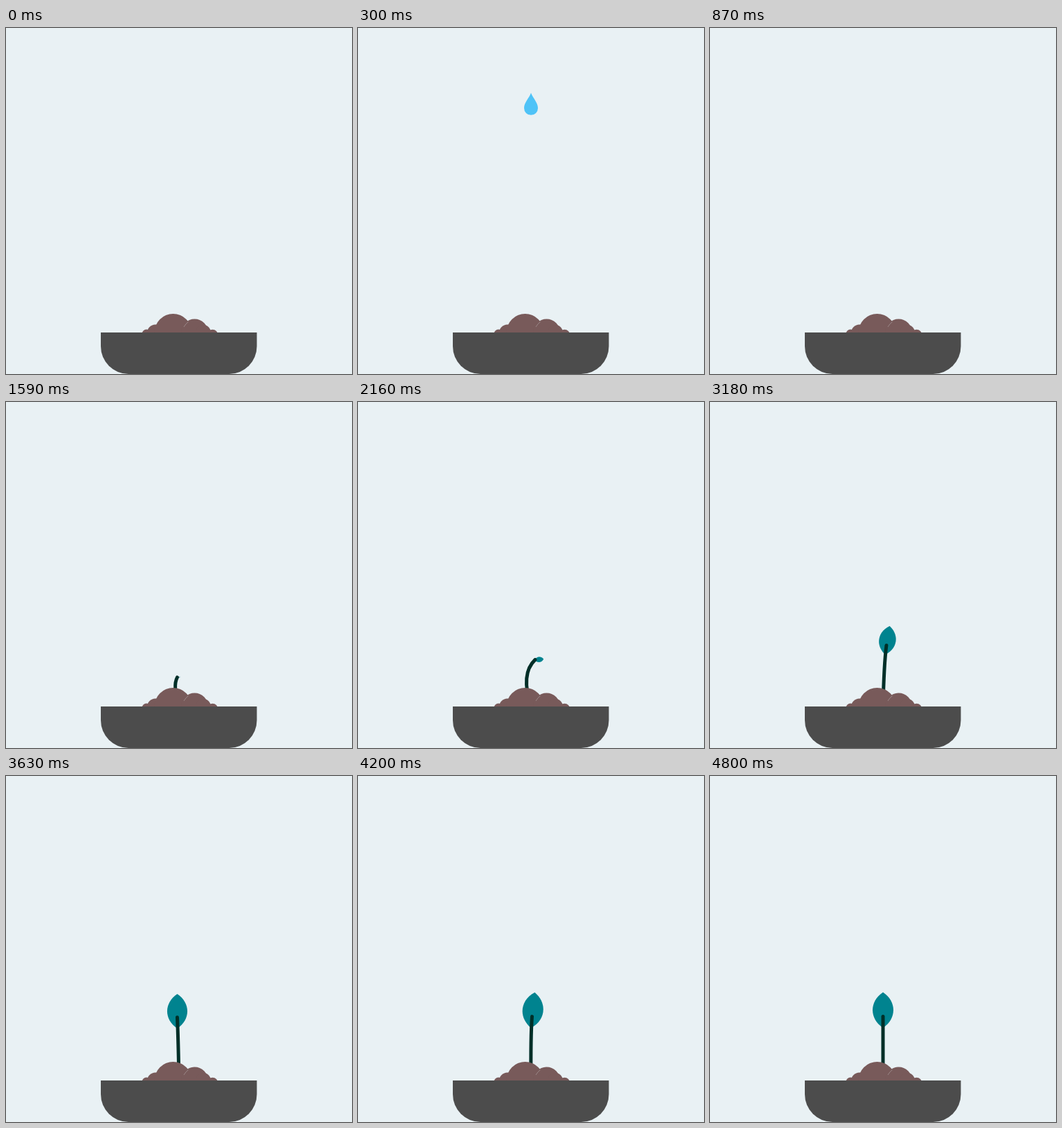
Animation, 500 px wide and 500 px high, one loop 5430 ms. Source, as an HTML page:

```html
<!DOCTYPE html>
<html lang="en">
<head>
<meta charset="utf-8">
<title>Sprout</title>
<style>
  html, body { margin: 0; width: 100%; height: 100%; overflow: hidden; background: #e9f1f4; }
  svg { display: block; width: 100%; height: 100%; }
</style>
</head>
<body>
<svg viewBox="0 0 500 500">
  <path id="drop" fill="#4fc3f7" d="M0 0C3 8 10 14 10 22A10 10 0 0 1 -10 22C-10 14 -3 8 0 0Z"/>
  <g id="plant">
    <path id="leaf" fill="#00838f" d="M0 -35C20 -21.5 20 3 0 16.5C-20 3 -20 -21.5 0 -35Z"/>
    <path id="stem" fill="none" stroke="#002f28" stroke-width="5" stroke-linecap="round"/>
  </g>
  <g fill="#785a5a">
    <circle cx="203" cy="442" r="6.5"/>
    <circle cx="216" cy="440.5" r="12"/>
    <circle cx="241.500" cy="440" r="27"/>
    <circle cx="272.5" cy="440" r="19.5"/>
    <circle cx="285" cy="440" r="11"/>
    <circle cx="298.500" cy="443.5" r="7.8"/>
  </g>
  <path d="M263.5 424.5Q259.500 427.500 257 432" fill="none" stroke="#a89a9b" stroke-width=".7"/>
  <path fill="#4c4c4c" d="M137 440H362.500V460A40 40 0 0 1 322.500 500H177A40 40 0 0 1 137 460Z"/>
</svg>
<script>
const LOOP = 5430, STEP = 30;
const BASE = { x: 250, y: 440 }, HEIGHT = 92.5;
const [drop, plant, leaf, stem] = ['drop', 'plant', 'leaf', 'stem'].map(id => document.getElementById(id));

const clamp = v => Math.max(0, Math.min(1, v));
const span = (t, from, to) => clamp((t - from) / (to - from));
const smooth = v => v * v * (3 - 2 * v);

// Poses of the sway: time, tip offset, bend offset, leaf angle
const sway = [
  [1000, -4, -5, 60],
  [1500, -3, -9, 75],
  [2160, 6, -15.5, 84],
  [2730, -10.5, -4.5, -25],
  [3200, 5, 1.5, 9],
  [3630, -2.5, -1.2, 0],
  [4200, 1.5, -0.6, 6],
  [4800, 0, 0, 0]
];

function poseAt(t) {
  const i = sway.findIndex(k => k[0] > t);
  if (i === 0) return sway[0].slice(1);
  if (i < 0) return sway[sway.length - 1].slice(1);
  const a = sway[i - 1], b = sway[i];
  const v = smooth(span(t, a[0], b[0]));
  return a.slice(1).map((n, j) => n + (b[j + 1] - n) * v);
}

function show(el, on) {
  el.setAttribute('visibility', on ? 'visible' : 'hidden');
}

function draw(t) {
  const fall = span(t, 60, 570);
  show(drop, t >= 60 && t < 630);
  drop.setAttribute('transform', `translate(250 ${13 + 365 * fall * fall})`);

  show(plant, t >= 1000);
  const h = HEIGHT * (1 - Math.pow(1 - span(t, 1000, 4800), 3.6));
  const [tip, bend, angle] = poseAt(t);
  const x = BASE.x + tip, y = BASE.y - h;
  stem.setAttribute('d', `M${BASE.x} ${BASE.y}Q${BASE.x + bend} ${BASE.y - h * 0.7} ${x} ${y}`);
  // The leaf slides a little towards the side it leans to
  const size = smooth(span(t, 1300, 3900));
  leaf.setAttribute('transform', `translate(${x + angle * 0.04} ${y}) rotate(${angle}) scale(${size})`);
}

const start = performance.now();
function tick() {
  const t = (performance.now() - start) % LOOP;
  draw(Math.floor(t / STEP) * STEP);
  requestAnimationFrame(tick);
}
tick();
</script>
</body>
</html>
```
